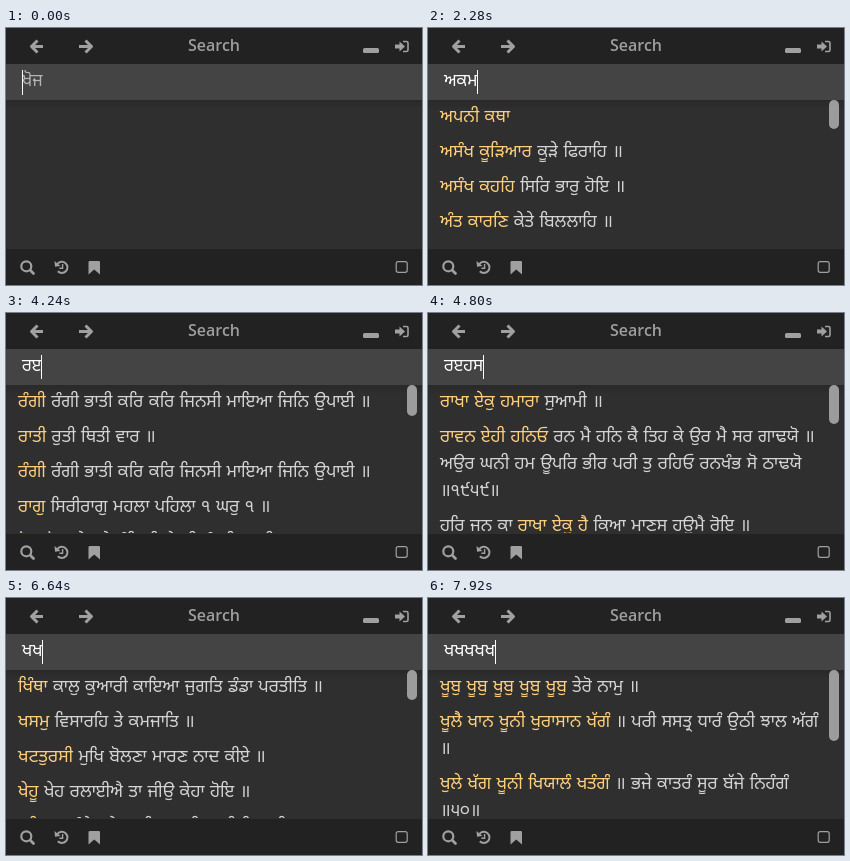
Write an HTML page that moves like this. It is 416x257 px and loops after 8000 ms.

```html
<!DOCTYPE html>
<html lang="pa">
<head>
<meta charset="utf-8">
<title>Search</title>
<style>
html, body { margin: 0; width: 100%; height: 100%; overflow: hidden; background: #2f2f2f; }
svg { display: block; width: 416px; height: 257px; }
text { font-family: "Noto Sans Gurmukhi", "Noto Sans", sans-serif; font-weight: 500; white-space: pre; }
.title { font: 600 16px "Open Sans", "Noto Sans", sans-serif; fill: #9e9e9e; }
.field { font-size: 17px; }
.row { font-size: 17.5px; word-spacing: 0.8px; fill: #d4d4d4; }
.hit { fill: #ffcf7c; }
.line { fill: none; stroke: #a0a0a0; }
.solid { fill: #a0a0a0; }
</style>
</head>
<body>
<svg viewBox="0 0 416 257">
  <defs>
    <clipPath id="view"><rect y="72" width="416" height="148"/></clipPath>
    <linearGradient id="shade" x2="0" y2="1">
      <stop stop-color="#292929"/><stop offset="1" stop-color="#2f2f2f"/>
    </linearGradient>
  </defs>
  <rect width="416" height="257" fill="#2f2f2f"/>
  <rect y="72" width="416" height="10" fill="url(#shade)"/>
  <g id="rows" clip-path="url(#view)"></g>
  <rect id="thumb" x="401" y="72" width="10" rx="5" fill="#9c9c9c"/>

  <rect width="416" height="36" fill="#222"/>
  <rect y="36" width="416" height="36" fill="#444"/>
  <rect y="221" width="416" height="36" fill="#222"/>
  <text class="title" x="208" y="23" text-anchor="middle">Search</text>
  <g class="line" stroke-width="3" stroke-linejoin="round">
    <path d="M31.5 12.5L25.5 18.5L31.5 24.5M26 18.5H37"/>
    <path d="M79.5 12.5L85.5 18.5L79.5 24.5M85 18.5H73"/>
  </g>
  <rect class="solid" x="357" y="20" width="16" height="5" rx="1.5"/>
  <path class="solid" d="M389 16.5H393.5V13.5L399 18.5L393.5 23.5V20.5H389Z"/>
  <path class="line" stroke-width="1.6" d="M397 13.5H400.5Q402 13.5 402 15V22Q402 23.5 400.5 23.5H397"/>

  <circle class="line" cx="20.3" cy="238.3" r="5" stroke-width="2.2"/>
  <path class="line" stroke-width="2.8" stroke-linecap="round" d="M24.5 242.5L27.5 245.5"/>
  <path class="line" stroke-width="2" d="M51.5 235.8A5.6 5.6 0 1 1 51.8 243.2"/>
  <path class="solid" d="M48.5 233L49 238.8L54.5 238Z"/>
  <path class="line" stroke-width="1.4" d="M56.6 236V240.2H53.4"/>
  <path class="solid" d="M82.5 234.2Q82.5 233 83.7 233H92.8Q94 233 94 234.2V246.5L88.2 241.5L82.5 246.5Z"/>
  <rect class="line" x="390.2" y="233.7" width="11" height="10.6" rx="2" stroke-width="1.2"/>

  <rect id="mark" x="16" y="42" height="24" fill="#3d6fa5"/>
  <text id="field" class="field" x="16" y="58"></text>
  <rect id="caret" y="42" width="1" fill="#fff"/>
</svg>
<script>
const $ = id => document.getElementById(id);
const LOOP = 8000;

// Result lists: thumb length, then rows; "|" ends the highlighted part, "/" wraps,
// "~" puts plain text before the highlight.
const lists = {
  none: [0],
  a: [29, "ਅਪਨੀ| ਕਥਾ", "ਅਸੰਖ| ਜਪ ਅਸੰਖ ਭਾਉ ॥", "ਅਸੰਖ| ਪੂਜਾ ਅਸੰਖ ਤਪ ਤਾਉ ॥", "ਅਸੰਖ| ਗਰੰਥ ਮੁਖਿ ਵੇਦ ਪਾਠ ॥", "ਅਸੰਖ| ਜੋਗ ਮਨਿ ਰਹਹਿ ਉਦਾਸ ॥"],
  ak: [29, "ਅਪਨੀ ਕਥਾ|", "ਅਸੰਖ ਕੂੜਿਆਰ| ਕੂੜੇ ਫਿਰਾਹਿ ॥", "ਅਸੰਖ ਕਹਹਿ| ਸਿਰਿ ਭਾਰੁ ਹੋਇ ॥", "ਅੰਤ ਕਾਰਣਿ| ਕੇਤੇ ਬਿਲਲਾਹਿ ॥"],
  akm: [30, "ਆਪੇ ਕਰਤਾ ਮੇਲਿ| ਮਿਲਾਵੈ ॥", "ਐਸੀ ਕਿਰਪਾ ਮੋਹਿ| ਕਰਹੁ ॥", "ਅੰਗੀਕਾਰੁ ਕੀਓ ਮੇਰੈ| ਕਰਤੈ ਗੁਰ ਪੂਰੇ ਕੀ ਵਡਿਆਈ ॥", "ਅੰਤਰ ਕੀ ਮਲੁ| ਕਬ ਹੀ ਨ ਜਾਏ ॥੧॥"],
  akmk: [32, "ਐਸੀ ਕਿਰਪਾ ਮੋਹਿ ਕਰਹੁ ॥|", "ਅੰਗੀਕਾਰੁ ਕੀਓ ਮੇਰੈ ਕਰਤੈ| ਗੁਰ ਪੂਰੇ ਕੀ ਵਡਿਆਈ ॥", "ਆਪਸ ਕਉ ਮੁਨਿਵਰ ਕਰਿ| ਥਾਪਹੁ ਕਾ ਕਉ ਕਹਹੁ ਕਸਾਈ ॥੨॥", "ਅੰਤਰ ਕੀ ਮਲੁ ਕਬ| ਹੀ ਨ ਜਾਏ ॥੧॥", "ਅਵਰ ਕਰਮ ਮਨ ਕੀਜੈ| ਕੀ ਕੀਰਤਿ ਜੀਉ ਕੀਓ ਜੀ"],
  r: [31, "ਰੰਗੀ| ਰੰਗੀ ਭਾਤੀ ਕਰਿ ਕਰਿ ਜਿਨਸੀ ਮਾਇਆ ਜਿਨਿ ਉਪਾਈ ॥", "ਰਾਤੀ| ਰੁਤੀ ਥਿਤੀ ਵਾਰ ॥", "ਰੰਗੀ| ਰੰਗੀ ਭਾਤੀ ਕਰਿ ਕਰਿ ਜਿਨਸੀ ਮਾਇਆ ਜਿਨਿ ਉਪਾਈ ॥", "ਰਾਗੁ| ਸਿਰੀਰਾਗੁ ਮਹਲਾ ਪਹਿਲਾ ੧ ਘਰੁ ੧ ॥", "ਰੋਗੁ| ਭੋਗੁ ਦੇਹ ਤੇ ਰੰਗਿ ਮਿਲੇ ਕੀ ਸੰਗਤਿ ਪਾਈ"],
  ri: [31, "ਰਾਖਾ ਏਕੁ| ਹਮਾਰਾ ਸੁਆਮੀ ॥", "ਰਾਮ ਇਕੁ| ਨਾਮੁ ਨ ਵੀਸਰੈ ॥", "ਰਤਨੁ ਇਹੁ| ਮਨੁ ਪਾਇਆ ॥", "ਰੰਗਿ ਇਕੁ| ਰਤੇ ਸਚਿ ਸਮਾਇ ॥"],
  rih: [39, "ਰਾਖਾ ਏਕੁ ਹਮਾਰਾ| ਸੁਆਮੀ ॥", "ਰਾਵਨ ਏਹੀ ਹਨਿਓ| ਰਨ ਮੈ ਹਨਿ ਕੈ ਤਿਹ ਕੇ ਉਰ ਮੈ ਸਰ ਗਾਢਯੋ ॥/ਅਉਰ ਘਨੀ ਹਮ ਊਪਰਿ ਭੀਰ ਪਰੀ ਤੁ ਰਹਿਓ ਰਨਖੰਭ ਸੋ ਠਾਢਯੋ/॥੧੯੫੯॥", "ਹਰਿ ਜਨ ਕਾ ~ਰਾਖਾ ਏਕੁ ਹੈ| ਕਿਆ ਮਾਣਸ ਹਉਮੈ ਰੋਇ ॥"],
  rihs: [0, "ਰਾਖਾ ਏਕੁ ਹਮਾਰਾ ਸੁਆਮੀ ॥|"],
  k: [30, "ਖਿੰਥਾ| ਕਾਲੁ ਕੁਆਰੀ ਕਾਇਆ ਜੁਗਤਿ ਡੰਡਾ ਪਰਤੀਤਿ ॥", "ਖਸਮੁ| ਵਿਸਾਰਹਿ ਤੇ ਕਮਜਾਤਿ ॥", "ਖਟਤੁਰਸੀ| ਮੁਖਿ ਬੋਲਣਾ ਮਾਰਣ ਨਾਦ ਕੀਏ ॥", "ਖੇਹੂ| ਖੇਹ ਰਲਾਈਐ ਤਾ ਜੀਉ ਕੇਹਾ ਹੋਇ ॥", "ਖਤਿਅਹੁ| ਜੰਮੇ ਖਤੇ ਕਰਨਿ ਤ ਖਤਿਆ ਵਿਚਿ ਪਾਹਿ"],
  kk: [30, "ਖੇਹੂ ਖੇਹ| ਰਲਾਈਐ ਤਾ ਜੀਉ ਕੇਹਾ ਹੋਇ ॥", "ਖਾਵਣ ਖਰਚਣ| ਕਉ ਹਰਿ ਦੀਆ ॥", "ਖੂਬੁ ਖੂਬੁ| ਖੂਬੁ ਖੂਬੁ ਖੂਬੁ ਤੇਰੋ ਨਾਮੁ ॥", "ਖਾਤ ਖਰਚਤ| ਕਛੁ ਤੋਟਿ ਨ ਆਵੈ ॥"],
  kkk: [31, "ਖਾਤ ਖਰਚਤ ਖੂਬੁ| ਸੁਖੁ ਪਾਇਆ ॥", "ਖੂਬੁ ਖੂਬੁ ਖੂਬੁ| ਖੂਬੁ ਖੂਬੁ ਤੇਰੋ ਨਾਮੁ ॥", "ਖਾਵਤ ਖਰਚਤ ਖਾਟਿ| ਚਲੇ ॥", "ਖੂਲੈ ਖਾਨ ਖੂਨੀ| ਖੁਰਾਸਾਨ ਖੱਗੰ ॥"],
  k4: [48, "ਖੂਬੁ ਖੂਬੁ ਖੂਬੁ ਖੂਬੁ| ਖੂਬੁ ਤੇਰੋ ਨਾਮੁ ॥", "ਖੂਲੈ ਖਾਨ ਖੂਨੀ ਖੁਰਾਸਾਨ| ਖੱਗੰ ॥ ਪਰੀ ਸਸਤ੍ਰ ਧਾਰੰ ਉਠੀ ਝਾਲ ਅੱਗੰ/॥", "ਖੁਲੇ ਖੱਗ ਖੂਨੀ ਖਿਯਾਲੰ| ਖਤੰਗੰ ॥ ਭਜੇ ਕਾਤਰੰ ਸੂਰ ਬੱਜੇ ਨਿਹੰਗੰ/॥੫੦॥"],
  k5: [71, "ਖੂਬੁ ਖੂਬੁ ਖੂਬੁ ਖੂਬੁ ਖੂਬੁ| ਤੇਰੋ ਨਾਮੁ ॥", "ਖੂਲੈ ਖਾਨ ਖੂਨੀ ਖੁਰਾਸਾਨ ਖੱਗੰ| ॥ ਪਰੀ ਸਸਤ੍ਰ ਧਾਰੰ ਉਠੀ ਝਾਲ ਅੱਗੰ/॥", "ਖੁਲੇ ਖੱਗ ਖੂਨੀ ਖਿਯਾਲੰ ਖਤੰਗੰ| ॥ ਭਜੇ ਕਾਤਰੰ ਸੂਰ ਬੱਜੇ ਨਿਹੰਗੰ/॥੫੦॥"]
};

// Each step: start time and what changes there.
const steps = [
  [0, { text: "", list: "none", caret: 1, mark: 0 }], [440, { caret: 0 }], [1240, { caret: 1 }],
  [1640, { text: "ਅ" }], [1800, { list: "a" }], [2000, { text: "ਅਕ" }], [2080, { list: "ak" }],
  [2280, { text: "ਅਕਮ" }], [2480, { text: "ਅਕਮਕ", list: "akm" }], [2680, { list: "akmk" }],
  [3160, { caret: 0 }], [3400, { mark: 1 }], [3640, { text: "", list: "none", caret: 1, mark: 0 }],
  [4120, { text: "ਰ" }], [4240, { text: "ਰੲ", list: "r" }], [4520, { text: "ਰੲਹ", list: "ri" }],
  [4680, { text: "ਰੲਹਸ" }], [4800, { list: "rih" }], [5080, { list: "rihs" }], [5200, { caret: 0 }],
  [5640, { text: "", caret: 1 }], [5840, { list: "none" }], [6320, { text: "ਖ" }], [6440, { list: "k" }],
  [6640, { text: "ਖਖ" }], [6800, { list: "kk" }], [7080, { text: "ਖਖਖ" }],
  [7360, { text: "ਖਖਖਖ", list: "kkk" }], [7720, { text: "ਖਖਖਖਖ", list: "k4" }], [7920, { list: "k5" }]
];

const span = (s, cls = "") => s ? `<tspan class="${cls}">${s}</tspan>` : "";

function paintList([size, ...rows]) {
  let y = 94, out = "";
  for (const row of rows) {
    const lines = row.split("/");
    lines.forEach((line, i) => {
      const [head, tail] = line.includes("|") ? line.split("|") : ["", line];
      const [lead, hit] = head.includes("~") ? head.split("~") : ["", head];
      out += `<text class="row" x="12" y="${y + 27 * i}">${span(lead)}${span(hit, "hit")}${span(tail)}</text>`;
    });
    y += 27 * lines.length + 8;
  }
  $("rows").innerHTML = out;
  $("thumb").setAttribute("height", size);
}

function paint(s) {
  const field = $("field");
  field.textContent = s.text || "ਖੋਜ";
  field.setAttribute("fill", s.text ? "#fff" : "#b4b4b4");
  const width = s.text ? Math.round(field.getComputedTextLength()) : 0;
  $("caret").setAttribute("x", 16 + width);
  $("caret").setAttribute("height", s.text ? 24 : 25);
  $("caret").setAttribute("opacity", s.caret);
  $("mark").setAttribute("width", s.mark * width);
  paintList(lists[s.list]);
}

let last = -1;
function frame(now) {
  const t = now % LOOP;
  const n = steps.filter(([at]) => at <= t).length;
  if (n !== last) {
    paint(Object.assign({}, ...steps.slice(0, n).map(step => step[1])));
    last = n;
  }
  requestAnimationFrame(frame);
}
requestAnimationFrame(frame);
</script>
</body>
</html>
```
